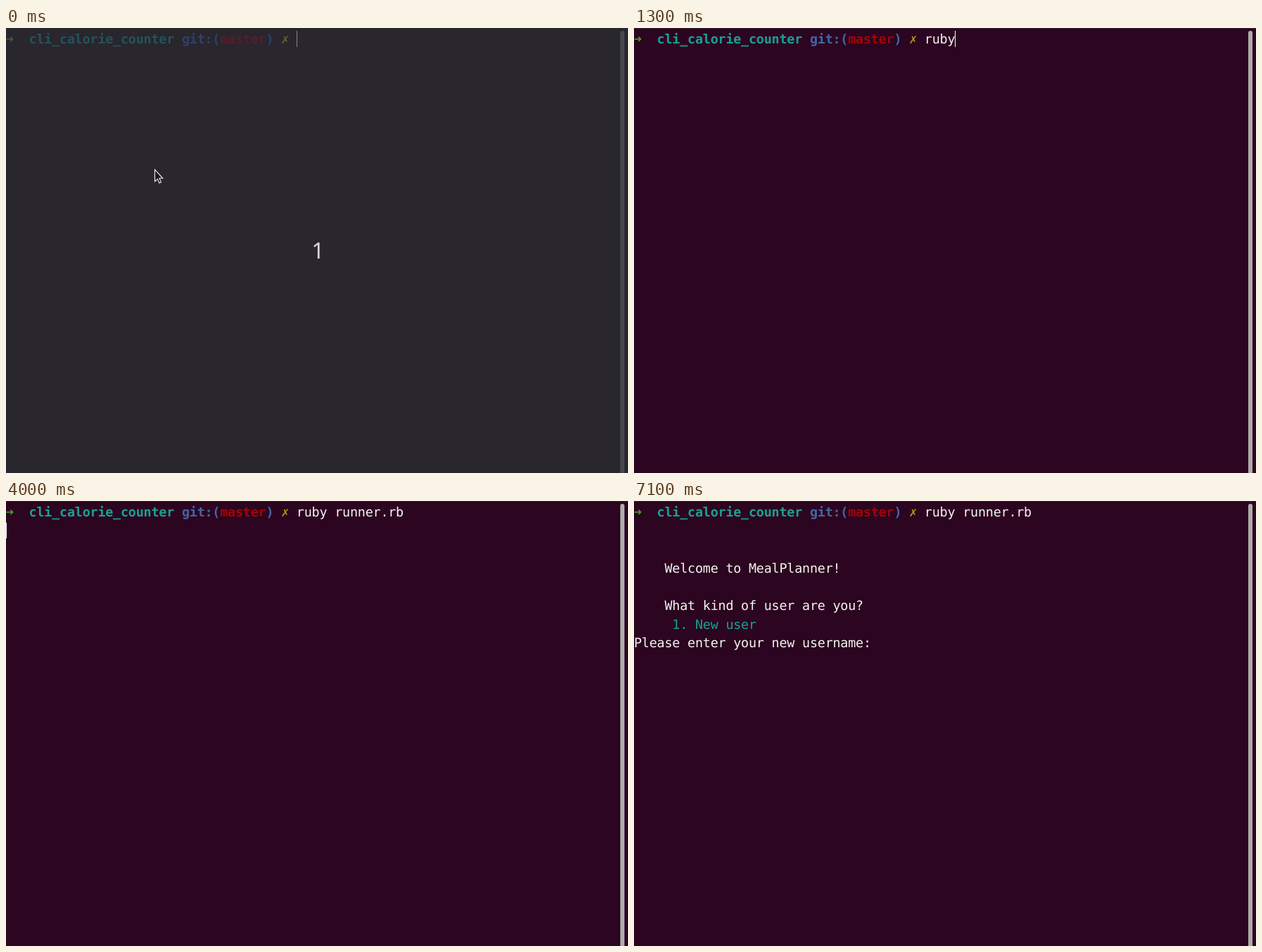
An HTML page that plays this animation: 884 by 633 pixels, repeating every 8000 ms.

```html
<!DOCTYPE html>
<html lang="en">
<head>
<meta charset="utf-8">
<title>Terminal session</title>
<style>
  html, body { margin: 0; width: 100%; height: 100%; overflow: hidden; }
  svg {
    display: block; width: 884px; height: 633px;
    --bg: #2c0520; --edge: #33242e; --bar: #aeaaaa; --caret: #fff;
    --green: #4e9a30; --teal: #18a193; --blue: #4266a6; --red: #a80303;
    --yellow: #b0941a; --white: #f4f4f0; --aqua: #45e0d6;
    background: var(--bg);
  }
  svg.dim {
    --bg: #29262d; --edge: #29262d; --bar: #47464e; --caret: #85838a;
    --green: #4b5a35; --teal: #23535c; --blue: #30416a; --red: #581d2d;
    --yellow: #66602f;
  }
  text {
    font: 18.43px "DejaVu Sans Mono", monospace;
    white-space: pre; text-rendering: geometricPrecision;
  }
  .bold { font-weight: bold; }
  #count { font: 32px "Noto Sans", "Open Sans", sans-serif; fill: #dcd6de; }
</style>
</head>
<body>
<svg id="stage" viewBox="0 0 884 633" xmlns="http://www.w3.org/2000/svg">
  <rect width="884" height="1" fill="var(--edge)"/>
  <rect x="873" y="4" width="6" height="640" rx="3" fill="var(--bar)"/>
  <g id="prompt"></g>
  <g id="intro"></g>
  <g id="menu"></g>
  <g id="answer"></g>
  <rect id="caret" width="1" fill="var(--caret)"/>
  <path id="arrow" d="M211.5 201.5V218.2L215.3 214.8L217.8 220.5L220.4 219.4L218 213.8H222.8Z"
        fill="#1c1a1f" stroke="#f2f0f2" stroke-width="1.1"/>
  <g id="beam" fill="none">
    <path d="M208.5 195.5H215.5M208.5 208.5H215.5M212 195V209" stroke="#f4f4f4" stroke-width="3"/>
    <path d="M209 195.5H215M209 208.5H215M212 195V209" stroke="#120810" stroke-width="1"/>
  </g>
  <text id="count" x="443.5" y="328" text-anchor="middle">1</text>
</svg>
<script>
const LOOP = 8000, CELL = 10.865, ROW = 26.66, BASE = 21.7;
const COMMAND = "ruby runner.rb", PROMPT_COLS = 38;
const $ = id => document.getElementById(id);

// Places a string on the terminal's character grid.
function put(group, row, col, str, color, bold) {
  const el = document.createElementNS("http://www.w3.org/2000/svg", "text");
  el.setAttribute("x", [...str].map((_, i) => ((col + i) * CELL).toFixed(2)).join(" "));
  el.setAttribute("y", (BASE + row * ROW).toFixed(2));
  el.style.fill = `var(--${color})`;
  if (bold) el.classList.add("bold");
  el.textContent = str;
  $(group).append(el);
  return el;
}

put("prompt", 0, 0, "➜", "green", true);
put("prompt", 0, 3, "cli_calorie_counter", "teal", true);
put("prompt", 0, 23, "git:(", "blue", true);
put("prompt", 0, 28, "master", "red", true);
put("prompt", 0, 34, ")", "blue", true);
put("prompt", 0, 36, "✗", "yellow", true);
const typed = put("prompt", 0, PROMPT_COLS, COMMAND, "white");

put("intro", 3, 4, "Welcome to MealPlanner!", "white");
put("intro", 5, 4, "What kind of user are you?", "white");

put("menu", 6, 1, "(Press ↑/↓ arrow to move, Enter to select and letters to filter)", "aqua");
put("menu", 7, 0, ">", "teal");
["New user", "Existing user", "Sign in as guest", "Quit MealPlanner"].forEach((item, i) =>
  put("menu", 7 + i, 6, `${i + 1}. ${item}`, i ? "white" : "teal"));

put("answer", 6, 5, "1. New user", "teal");
put("answer", 7, 0, "Please enter your new username:", "white");

// [time, characters typed]
const KEYS = [[0, 0], [600, 1], [900, 3], [1300, 4], [1400, 5], [1800, 6], [1900, 7],
  [2100, 8], [2300, 10], [2500, 11], [2600, 12], [2800, 13], [3300, 14]];
// [time, caret row]; -1 hides it
const CARET = [[0, 0], [300, -1], [600, 0], [3800, -1], [4000, 1], [4600, -1]];

const at = (steps, t) => steps.filter(s => s[0] <= t).pop()[1];
const show = (id, on) => $(id).style.display = on ? "" : "none";

function draw(t) {
  const chars = at(KEYS, t), row = at(CARET, t), dim = t < 100;
  $("stage").classList.toggle("dim", dim);
  show("count", dim);
  show("arrow", dim);
  show("beam", !dim && t < 600);
  show("intro", t >= 5100);
  show("menu", t >= 5100 && t < 7100);
  show("answer", t >= 7100);
  typed.textContent = COMMAND.slice(0, chars);
  show("caret", row >= 0);
  $("caret").setAttribute("x", row ? 0 : Math.round((PROMPT_COLS + chars) * CELL));
  $("caret").setAttribute("y", row ? 31 : 4);
  $("caret").setAttribute("height", row ? 22 : 23);
}

const start = performance.now();
function tick() {
  draw((performance.now() - start) % LOOP);
  requestAnimationFrame(tick);
}
tick();
</script>
</body>
</html>
```
